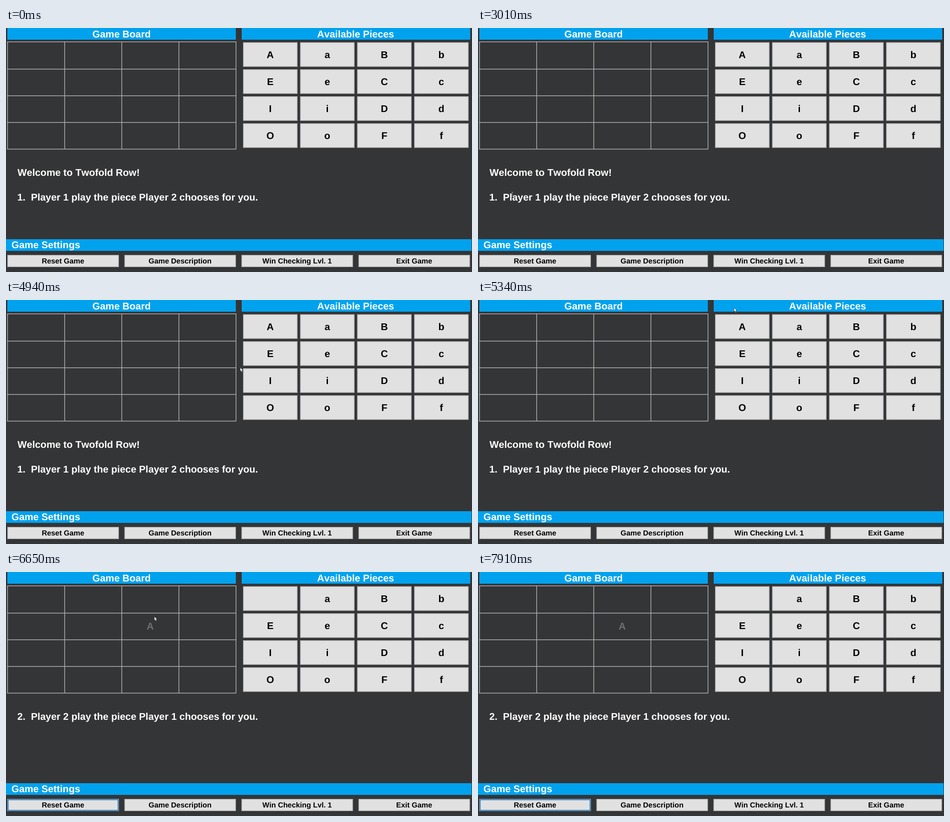
An HTML page that plays this animation: 1032x543 px, repeating every 7.99 s.

```html
<!DOCTYPE html>
<html lang="en">
<head>
<meta charset="utf-8">
<title>Board game</title>
<style>
  html, body { margin: 0; width: 100%; height: 100%; overflow: hidden; background: #343537; }
  svg { display: block; width: 1032px; height: 543px; }
  text {
    font: bold 21.75px "Liberation Sans", Arial, sans-serif;
    font-kerning: none;
    text-rendering: geometricPrecision;
    white-space: pre;
    fill: #fff;
  }
  .mid { text-anchor: middle; }
  .dark { fill: #000; }
  .small { font-size: 16.3px; }
  .played { fill: #6f6f70; }
  .bar { fill: #00a2ee; }
  .button { fill: #e1e1e1; stroke: #b9b9b9; stroke-width: 1.6; }
  .button.hover { fill: #e5f1fb; stroke: #0078d7; }
  .focus { fill: none; stroke: #0078d7; stroke-width: 1.6; }
  .grid { fill: none; stroke: #b4b4b4; stroke-width: 1.5; }
</style>
</head>
<body>
<svg id="stage" viewBox="0 0 1032 543"></svg>
<script>
const LOOP = 7990, STEP = 77;
const PRESS = 5560, LEAVE = 5640, DROP = 6410, TURN = 6650;
const stage = document.getElementById('stage');

function add(tag, attrs, parent = stage) {
  const el = document.createElementNS('http://www.w3.org/2000/svg', tag);
  for (const key in attrs) el.setAttribute(key, attrs[key]);
  parent.appendChild(el);
  return el;
}
const box = (x, y, width, height, cls) => add('rect', { x, y, width, height, class: cls });
function label(str, x, y, cls = '') {
  const el = add('text', { x, y, class: cls });
  el.textContent = str;
  return el;
}
const show = (el, on) => el.setAttribute('visibility', on ? 'visible' : 'hidden');

// Headings
box(3, 0, 506, 26, 'bar');
box(522, 0, 506, 26, 'bar');
box(0, 470, 1031, 26, 'bar');
label('Game Board', 256, 20.7, 'mid');
label('Available Pieces', 774.2, 20.7, 'mid');
label('Game Settings', 12, 490.4);

// Board
let lines = '';
for (let i = 0; i < 5; i++) {
  lines += `M${3.4 + i * 126.5} 30V270.2M2.3 ${(i ? 32 : 30.8) + i * 59.4}H510`;
}
add('path', { class: 'grid', d: lines });
const played = label('A', 319.3, 127.9, 'mid played');

// Pieces
const pieces = [...'AaBbEeCcIiDdOoFf'].map((letter, i) => {
  const x = 525.8 + (i % 4) * 126.3, y = 32.6 + Math.floor(i / 4) * 60.1;
  return {
    frame: box(x, y, 119, 53, 'button'),
    text: label(letter, x + 59.4, y + 34, 'mid dark')
  };
});
const first = pieces[0];

// Messages
const welcome = [
  label('Welcome to Twofold Row!', 25.6, 328.8),
  label('1.  Player 1 play the piece Player 2 chooses for you.', 25, 384.4)
];
const next = label('2.  Player 2 play the piece Player 1 chooses for you.', 25, 328.8);

// Settings
['Reset Game', 'Game Description', 'Win Checking Lvl. 1', 'Exit Game'].forEach((name, i) => {
  const x = 3.8 + i * 259.2;
  box(x, 505.8, 245.4, 25.4, 'button');
  label(name, x + 122.5, 524.3, 'mid dark small');
});
const focus = box(4.8, 506.8, 243.4, 23.6, 'focus');

// Pointer
const pointer = add('g', {});
const spot = add('circle', { cy: -1.5, r: 8.3, fill: '#a29d1d' }, pointer);
const beam = add('path', {
  d: 'M-2 -4.5H2M0 -4.5V4.5M-2 4.5H2', fill: 'none', stroke: '#a2a2a2', 'stroke-width': .8
}, pointer);
const arrow = add('path', {
  d: 'M0 0V9L2 7.2L3.6 10.6L5.2 9.9L3.7 6.7H6.4Z', fill: '#fff', stroke: '#222', 'stroke-width': .7
}, pointer);
const cargo = add('g', {}, pointer);
add('path', { d: 'M1 11H5M6 8H9', stroke: '#ddd', 'stroke-width': .8, 'stroke-dasharray': '1 1' }, cargo);
add('rect', { x: 6, y: 9.5, width: 4.5, height: 4.5, fill: '#222', stroke: '#fff', 'stroke-width': 1.1 }, cargo);

// Each move is a smooth curve through a few points, walked in equal steps
const moves = [];
const move = (from, to, ...points) => moves.push({ from, to, points });
move(450, 690, [806, 466], [592, 375]);
move(1160, 1390, [540, 370], [208, 316]);
move(1630, 2300, [155, 308], [103, 304], [160, 313], [239, 311]);
move(2540, 3330, [220, 311], [105, 316], [62, 345], [76, 370], [92, 374], [96, 374]);
move(3400, 3560, [150, 374], [258, 375]);
move(3860, 4090, [330, 377], [494, 376]);
move(4320, 4550, [501, 370], [513, 299]);
move(4710, 5490, [514, 290], [517, 205], [523, 95], [545, 8], [567, 17], [572, 52]);
move(5560, 6330, [571, 54], [467, 66], [328.5, 99]);
move(7440, 7910, [350, 112], [498, 222], [485, 298], [428.5, 326]);

function along(points, share) {
  const end = points.length - 1;
  const i = Math.min(end - 1, Math.floor(share * end));
  const u = share * end - i;
  const p = k => points[Math.max(0, Math.min(end, k))];
  return [0, 1].map(axis => {
    const a = p(i)[axis], b = p(i + 1)[axis];
    const out = (b - p(i - 1)[axis]) / 2, into = (p(i + 2)[axis] - a) / 2;
    const bend = out * (1 - u) - into * u;
    return a + (b - a) * u * u * (3 - 2 * u) + u * (1 - u) * bend;
  });
}

function pointerAt(t) {
  const now = moves.filter(m => t >= m.from).pop();
  if (!now) return null;
  const span = now.to - now.from, steps = Math.round(span / STEP);
  const done = Math.floor((t - now.from) / span * steps + .05);
  return along(now.points, Math.min(1, done / steps));
}

function draw(t) {
  const place = pointerAt(t);
  const dragging = t >= PRESS && t < DROP;
  const turned = t >= TURN;
  const overText = place && place[1] > 283;
  if (place) pointer.setAttribute('transform', `translate(${place})`);
  show(beam, overText);
  show(arrow, place && !overText);
  show(spot, dragging);
  show(cargo, dragging && t >= LEAVE);
  show(focus, t >= PRESS);
  show(first.text, !turned);
  show(played, turned);
  show(next, turned);
  welcome.forEach(line => show(line, !turned));
  first.frame.classList.toggle('hover', t >= 5415 && t < LEAVE);
}

const start = performance.now();
function tick() {
  draw((performance.now() - start) % LOOP);
  requestAnimationFrame(tick);
}
tick();
</script>
</body>
</html>
```
